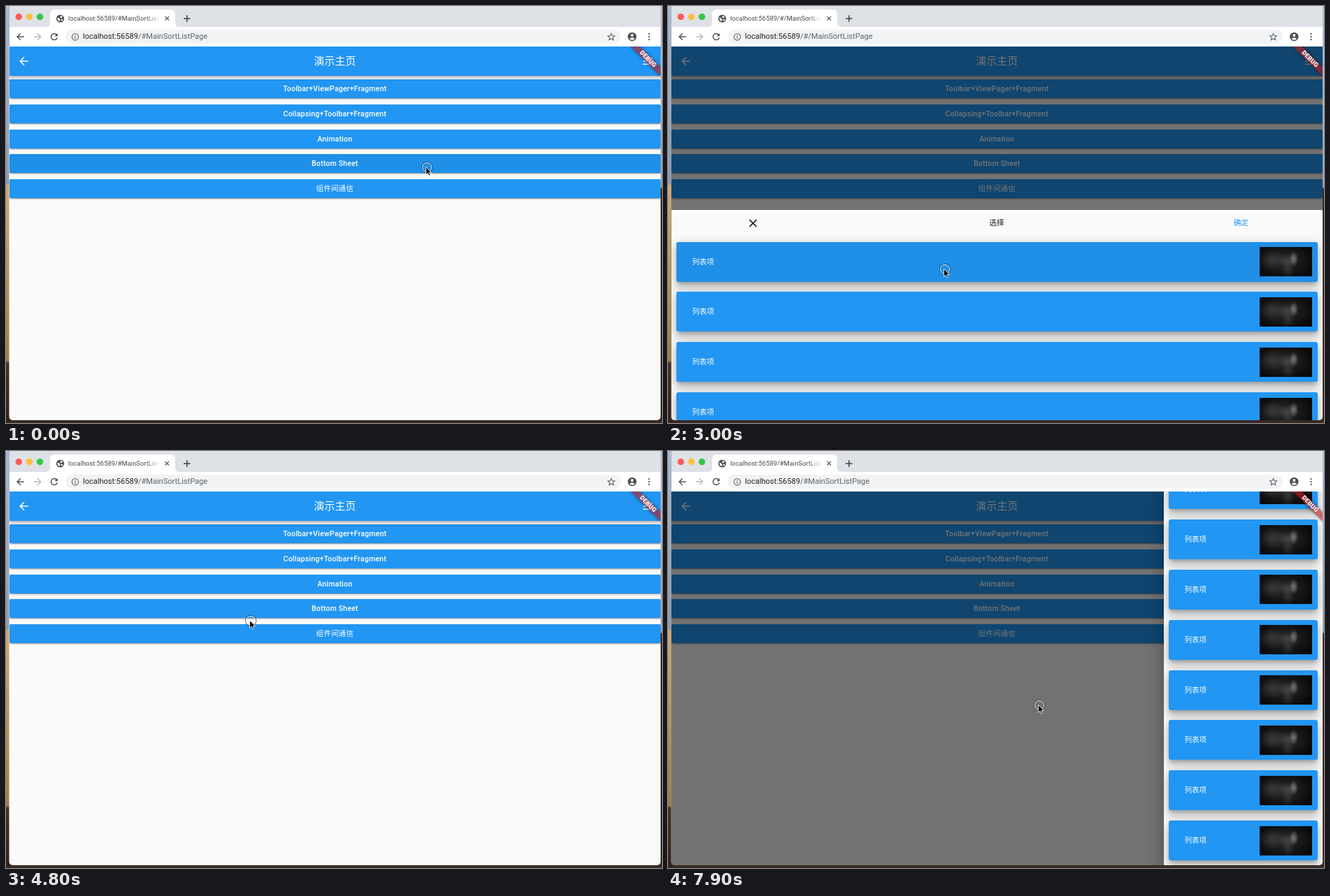
An HTML page for the animation above (8000 ms loop, 938 by 597 pixels).

```html
<!DOCTYPE html>
<html lang="zh-CN">
<head>
<meta charset="utf-8">
<title>演示主页</title>
<style>
  html, body { margin: 0; width: 100%; height: 100%; overflow: hidden; }
  body { font: 10.5px Roboto, "Noto Sans CJK SC", "Noto Sans CJK", sans-serif; }
  div, svg { position: absolute; }
  svg { left: 0; top: 0; }
  #stage {
    left: 0; top: 0; width: 938px; height: 597px; overflow: hidden;
    background:
      linear-gradient(#a9b9cf, #8d9cb0 255px, #cfab76 257px, #a27b45 508px, #4b3222 511px, #33231b) 0 0 / 5px 100% no-repeat,
      linear-gradient(#b4c0d2, #98a3b3 259px, #3d2b22 262px) 100% 0 / 3px 100% no-repeat,
      #3a2920;
  }
  #bar { left: 4.5px; top: 0; width: 931.5px; height: 58px; background: linear-gradient(#dee1e6 30px, #fff 30px); }
  .label { line-height: 16px; white-space: nowrap; color: #5f6368; }
  .label b { font-weight: 400; color: #202124; }
  #tab { left: 89px; top: 10px; width: 131px; overflow: hidden; font-size: 9.4px; color: #45494d;
    -webkit-mask: linear-gradient(90deg, #000 112px, transparent); mask: linear-gradient(90deg, #000 112px, transparent); }
  #url { left: 110px; top: 36px; font-size: 11.05px; }

  /* children keep stage coordinates, the clip cuts out the viewport */
  #app { inset: 0; clip-path: inset(58px 2px 4px 4.5px round 0 0 5px 5px); background: #fafafa; }
  .blue { background: #2196f3; color: #fff; }
  .blue.hover { background: #1f8fe8; }
  .center { text-align: center; left: 4.5px; width: 931.5px; }
  #head { top: 58px; height: 42px; line-height: 42px; font-size: 15px; font-weight: 500;
    box-shadow: 0 1.5px 3px -1px #0003, 0 3px 4px #00000024, 0 1px 7.5px #0000001f; }
  .button { height: 27px; line-height: 27px; border-radius: 1.5px; font-weight: 500; letter-spacing: .21px;
    box-shadow: 0 2.2px 1px -1.5px #0003, 0 1.5px 1.5px #00000024, 0 1px 4px #0000001f; }
  #dim { inset: 0; background: #000; }
  #ink { left: 899px; top: 61px; width: 36px; height: 36px; border-radius: 50%; background: #00000010; }
  #sheet { left: 4.5px; top: 292px; width: 931.5px; height: 301px; background: #fafafa; overflow: hidden; }
  #sheet .label { top: 11px; width: 60px; text-align: center; color: #111; }
  #drawer { left: 708.5px; top: 58px; width: 227.5px; height: 535px; background: #fafafa;
    box-shadow: 0 6px 7.5px -4px #0003, 0 12px 18px 1.5px #00000024, 0 4.5px 22px 4px #0000001f; }
  #clip { inset: 0; overflow: hidden; }
  #list { left: 0; top: 0; width: 100%; }
  .card { left: 7.5px; right: 7.5px; height: 57px; line-height: 57px; border-radius: 3px; text-indent: 22.5px; font-weight: 500;
    box-shadow: 0 4.5px 5px -2px #0003, 0 8px 11px 1px #00000024, 0 3px 15px 3px #0000001f; }
  .photo {
    background:
      radial-gradient(ellipse 9% 26% at 65% 40%, #8c8c8ccc, transparent),
      radial-gradient(ellipse 18% 24% at 53% 46%, #55555599, transparent),
      radial-gradient(ellipse 24% 36% at 24% 44%, #4a4a4a99, transparent),
      radial-gradient(ellipse 12% 34% at 54% 72%, #44444499, transparent),
      radial-gradient(ellipse 60% 62% at 46% 48%, #2b2b2b, #090909);
  }
  .card .photo { right: 7.5px; top: 7.5px; width: 75px; height: 42px; }
  #list > .photo { left: 0; top: 0; width: 100%; height: 173px; }
  #ribbon { left: 906px; top: 79px; width: 60px; height: 9px; background: #b71c1ca0; box-shadow: 0 0 4.5px #0008;
    transform-origin: 30px -21px; transform: rotate(45deg);
    font: 900 9px/9.5px Roboto, sans-serif; letter-spacing: .2px; color: #fff; text-align: center; }
</style>
</head>
<body>
<div id="stage">
  <div id="bar"></div>
  <svg width="938" height="58" fill="none" stroke="#5f6368" stroke-width="1.4">
    <g stroke="none">
      <circle cx="18.3" cy="15.5" r="4.7" fill="#fc5b57"/>
      <circle cx="33.4" cy="15.5" r="4.7" fill="#fdbd3f"/>
      <circle cx="48.5" cy="15.5" r="4.7" fill="#34c648"/>
      <path d="M57 30q6 0 6-6V12q0-7 7-7H235q7 0 7 7V24q0 6 6 6z" fill="#fff"/>
      <rect x="85" y="34" width="794" height="20" rx="10" fill="#f1f3f4"/>
      <circle cx="77.5" cy="18" r="5.6" fill="#4d5156"/>
      <path d="M73.5 16.5l3 1.2 1 2.2-1.4 2.2q-2.800-2-2.600-5.600zM78 13.800l3.200 1.600-1.800 1.800-2-1zM79 18.800l2.600.4-1.600 2.400-1.400-1z" fill="#fff"/>
      <circle cx="895.300" cy="44" r="6.200" fill="#4d5156"/>
      <circle cx="895.300" cy="42" r="2" fill="#fff"/>
      <path d="M891.500 47q3.800-3.400 7.600 0-3.800 3.600-7.600 0z" fill="#fff"/>
      <g fill="#5f6368"><circle cx="919.500" cy="40" r="1.200"/><circle cx="919.500" cy="44" r="1.200"/><circle cx="919.500" cy="48" r="1.200"/></g>
    </g>
    <path d="M227.500 15l5.500 5.500M233 15l-5.500 5.500"/>
    <path d="M254 18h9.600M258.800 13.200v9.600" stroke="#3c4043" stroke-width="1.500"/>
    <path d="M25.800 44H16.200M20.800 39.200L16 44l4.800 4.800" stroke="#4d5156"/>
    <path d="M40 44h9.600M45 39.200l4.800 4.800-4.800 4.800" stroke="#babcbe"/>
    <path d="M72.600 41.300A4.500 4.500 0 1 0 73.300 45.200" stroke="#4d5156"/>
    <path d="M73.800 39v4.300h-4.300z" fill="#4d5156" stroke="none"/>
    <circle cx="99" cy="44.200" r="4.700" stroke-width="1.100"/>
    <path d="M99 43.600v3.200M99 41.300v1.200" stroke-width="1.200"/>
    <path d="M865.500 39.400l1.400 3.200 3.500.3-2.600 2.300.8 3.400-3.100-1.800-3.100 1.800.8-3.400-2.600-2.300 3.500-.3z" stroke-width="1.100"/>
  </svg>
  <div id="tab" class="label"></div>
  <div id="url" class="label"></div>

  <div id="app">
    <div id="buttons"></div>
    <div id="head" class="blue center">演示主页</div>
    <div id="ink"></div>
    <svg width="938" height="110" fill="none" stroke="#fff" stroke-width="1.600">
      <path d="M31.700 79H20.500M26 73.300L20.300 79l5.700 5.700M911 74.700h13.500M911 79h13.500M911 83.300h13.500"/>
    </svg>
    <div id="dim"></div>
    <div id="sheet">
      <svg width="200" height="40" stroke="#111" stroke-width="1.700"><path d="M111.500 14l10 10M121.500 14l-10 10"/></svg>
      <div class="label" style="left:435.500px">选择</div>
      <div class="label" style="left:785px;color:#2196f3">确定</div>
    </div>
    <div id="drawer"><div id="clip"><div id="list"><div class="photo"></div></div></div></div>
    <div id="ribbon">DEBUG</div>
  </div>

  <svg id="cursor" width="40" height="40" viewBox="-20 -20 40 40" fill="none">
    <circle r="7.500" stroke="#111" stroke-opacity=".75"/>
    <circle r="6.700" stroke="#fff" stroke-width=".9"/>
    <path d="M-1.500-.5V10.400L1 8.200 2.700 12 4.600 11.200 2.900 7.500H6.300z" fill="#000" stroke="#fff" stroke-width=".8"/>
  </svg>
</div>
<script>
const $ = id => document.getElementById(id);
const PITCH = 35.93, CARD = 71.85;

function add(parent, cls, top, html) {
  const el = document.createElement('div');
  el.className = cls;
  el.style.top = top + 'px';
  el.innerHTML = html;
  parent.append(el);
  return el;
}
const addCards = (parent, n, top) => Array.from({ length: n }, (_, i) =>
  add(parent, 'card blue', top + CARD * i, '列表项<div class="photo"></div>'));

const buttons = ['Toolbar+ViewPager+Fragment', 'Collapsing+Toolbar+Fragment', 'Animation', 'Bottom Sheet', '组件间通信']
  .map((text, i) => add($('buttons'), 'button blue center', 104.7 + PITCH * i, text));
const sheetCards = addCards($('sheet'), 4, 45.5);
const drawerCards = addCards($('list'), 10, 180.5);

// rows: time, then values
const path = [
  [450, 602, 231], [600, 576, 262], [750, 546, 291], [900, 546, 291],
  [1200, 560, 250], [1500, 582, 204], [1650, 583, 175], [1950, 584, 189],
  [2250, 510, 305], [2400, 425, 405], [2550, 370, 429], [2700, 362, 412], [3000, 396, 377],
  [3150, 396, 377], [3300, 372, 350], [3450, 314, 292], [3600, 280, 261],
  [4650, 280, 261], [4950, 420, 225], [5250, 750, 137], [5400, 860, 102], [5690, 911, 87],
  [6590, 911, 87], [7030, 860, 300], [7460, 840, 330], [7900, 531, 364]
];
const sheetMove = [[0, 301, 0], [150, 110, .3], [300, 0, .54], [3900, 0, .54], [4050, 6, .53], [4200, 175.5, .39], [4350, 301, .05], [4500, 301, 0]];
const drawerMove = [[6290, 270, 0], [6440, 105, .28], [6590, 0, .54]];
const scroll = [[6880, 0], [7030, 50], [7320, 240], [7610, 345], [7750, 355.9]];

function at(rows, t) {
  const i = rows.findIndex(r => r[0] > t);
  if (i < 0) return rows[rows.length - 1].slice(1);
  if (!i) return rows[0].slice(1);
  const [a, b] = [rows[i - 1], rows[i]];
  const k = (t - a[0]) / (b[0] - a[0]);
  return a.slice(1).map((v, j) => v + (b[j + 1] - v) * k);
}

const late = [5690, 5840, 5990, 6140, 6290, 6440, 6590, 6730, 6880, 7030, 7180, 7320, 7460, 7610, 7750, 7900];
const tick = t => t < 5690 ? Math.min(5550, Math.floor(t / 150) * 150) : late.filter(v => v <= t).pop();

function hover(list, on, y, pitch, height) {
  const hit = on && y >= 0 && y % pitch < height ? Math.floor(y / pitch) : -1;
  list.forEach((el, i) => el.classList.toggle('hover', i === hit));
}

function setAddress(slash) {
  const rest = '/#' + (slash ? '/' : '') + 'MainSortListPage';
  $('tab').textContent = 'localhost:56589' + rest;
  $('url').innerHTML = '<b>localhost:56589</b>' + rest;
}

let shown = -1;
function draw() {
  const t = tick(performance.now() % 8000);
  if (t !== shown) {
    shown = t;
    const [x, y] = at(path, t);
    const [drop, shade] = at(sheetMove, t);
    const [slide, veil] = at(drawerMove, t);
    const [off] = at(scroll, t);
    const alpha = Math.max(shade, veil);
    $('cursor').style.transform = `translate(${x - 20}px, ${y - 20}px)`;
    $('sheet').style.transform = `translateY(${drop}px)`;
    $('drawer').style.transform = `translateX(${slide}px)`;
    $('list').style.transform = `translateY(${-off}px)`;
    $('dim').style.opacity = alpha;
    $('ink').hidden = alpha > 0 || Math.hypot(x - 917, y - 79) > 18;
    hover(buttons, !alpha, y - 104.7, PITCH, 27);
    hover(sheetCards, !drop, y - 337.5, CARD, 57);
    hover(drawerCards, !slide && x > 716, y - 238.5 + off, CARD, 57);
    setAddress(t >= 150 && t < 4050);
  }
  requestAnimationFrame(draw);
}
draw();
</script>
</body>
</html>
```
